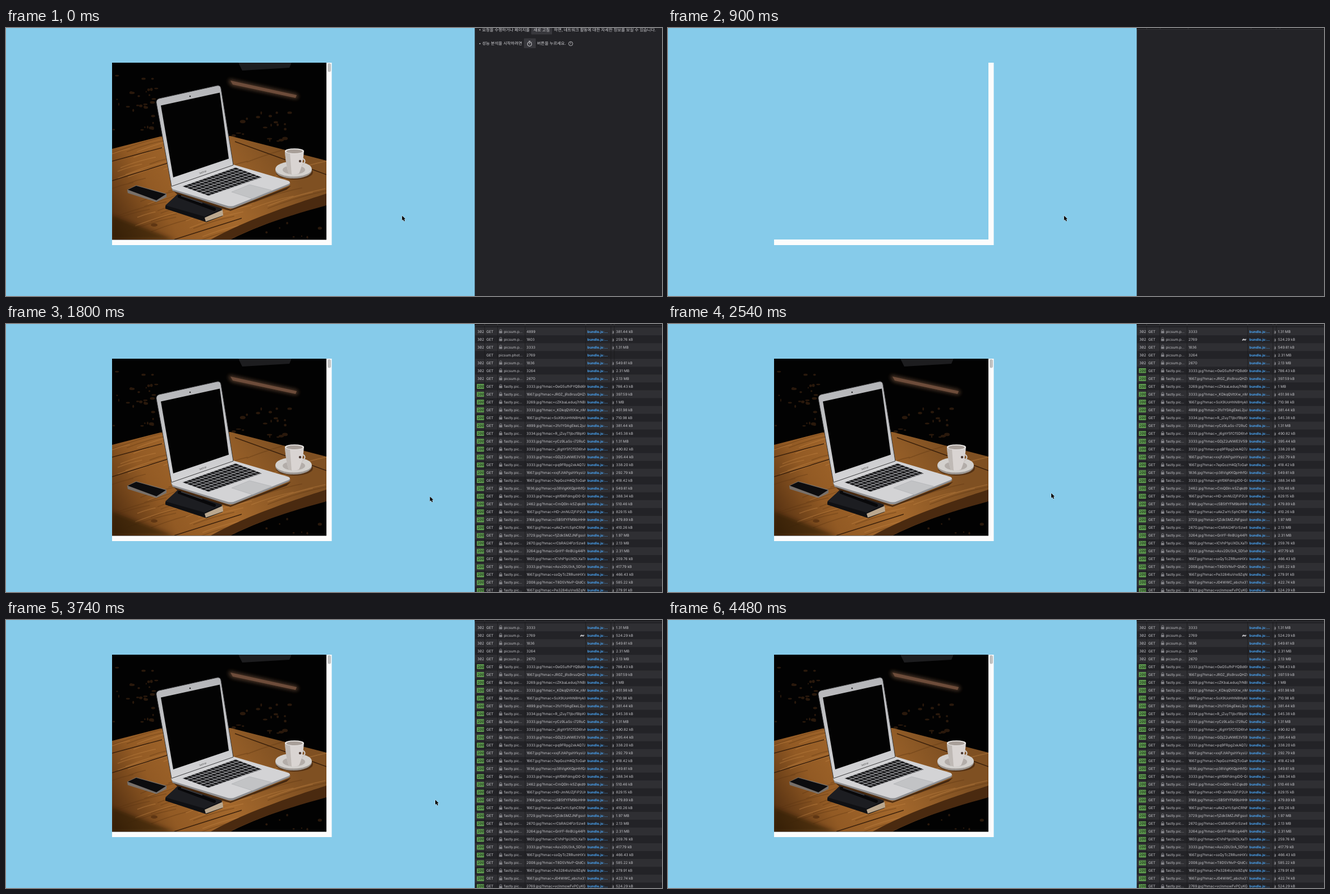
Recreate the animation shown at these times as an HTML page. Size 1169x479 px, loop 5080 ms.

```html
<!DOCTYPE html>
<html lang="ko">
<head>
<meta charset="utf-8">
<title>Network panel</title>
<style>
  html, body { margin: 0; width: 100%; height: 100%; overflow: hidden; background: #86cbea; }
  svg { display: block; width: 100%; height: 100%; }
  text { font-family: Inter, Roboto, sans-serif; font-size: 6.4px; fill: #c6c6ca; text-rendering: geometricPrecision; white-space: pre; }
  .ko { font-family: "Noto Sans CJK KR", "Noto Sans CJK", sans-serif; font-size: 7.3px; fill: #d2d2d6; }
  .code { font-family: "Noto Sans Mono", "DejaVu Sans Mono", monospace; font-size: 6.6px; }
  .ok { fill: #1d2b1c; }
  .link { fill: #4aa5f5; font-weight: 700; font-size: 6.2px; }
</style>
</head>
<body>
<svg viewBox="0 0 1169 479" preserveAspectRatio="none">
  <defs>
    <linearGradient id="wood" gradientUnits="userSpaceOnUse" x1="195" y1="378" x2="480" y2="205">
      <stop offset="0" stop-color="#4a290e"/>
      <stop offset=".3" stop-color="#925a24"/>
      <stop offset=".6" stop-color="#a4682c"/>
      <stop offset="1" stop-color="#7f5022"/>
    </linearGradient>
    <linearGradient id="lid" x1="0" y1="0" x2="0" y2="1">
      <stop offset="0" stop-color="#b4b5b8"/>
      <stop offset="1" stop-color="#d4d4d6"/>
    </linearGradient>
    <filter id="soft" x="-30%" y="-60%" width="160%" height="220%"><feGaussianBlur stdDeviation="3"/></filter>
    <pattern id="keys" width="1" height="1" patternUnits="userSpaceOnUse" patternTransform="matrix(6.800 -2.430 7.800 2.850 314 283)">
      <rect width="1" height="1" fill="#b4b5b8"/>
      <rect x=".08" y=".08" width=".84" height=".84" rx=".1" fill="#19191b"/>
    </pattern>
    <clipPath id="frame"><rect x="189" y="62" width="382" height="316.500"/></clipPath>
    <clipPath id="table"><path d="M189 216L275 194 400 193 571 237V296C515 314 430 342 365 378H189Z"/></clipPath>
    <clipPath id="file"><rect x="925" y="0" width="108" height="479"/></clipPath>
    <clipPath id="typeWide"><rect x="1085" y="0" width="5.500" height="479"/></clipPath>
    <clipPath id="type"><rect x="1079" y="0" width="4.600" height="479"/></clipPath>
  </defs>

  <rect width="1169" height="479" fill="#86cbea"/>
  <path d="M571 62H580.500V388H189V378H571Z" fill="#fcfcfc"/>
  <rect id="thumb" x="573" y="63" width="6" height="15.500" rx="3" fill="#c2c2c2"/>

  <g id="photo" clip-path="url(#frame)">
    <rect x="189" y="62" width="382" height="317" fill="#020202"/>
    <g id="leaves" fill="#2a190c"></g>
    <path d="M414 62H509L505 71 421 76Z" fill="#1d1d1f"/>
    <path d="M398 91L516 117Q526 122 517 127L404 104Q394 98 398 91Z" fill="#4c3426" filter="url(#soft)"/>
    <path d="M400 94L518 120 516 125 404 101Z" fill="#6d4c3a"/>
    <path d="M189 216L275 194 400 193 571 237V312C520 331 455 350 400 378H189Z" fill="url(#wood)"/>
    <path d="M571 296C515 314 430 342 365 378H400C455 350 520 331 571 317Z" fill="#4a2a10"/>
    <g clip-path="url(#table)">
      <g id="grain" fill="none" stroke-width="1.600" opacity=".35"></g>
      <path d="M189 273L287 242M408 203L571 262M189 238L278 214M300 378L420 340" fill="none" stroke="#3d220c" stroke-width="1.600"/>
    </g>
    <ellipse cx="264" cy="352" rx="6" ry="3" fill="#5f3613"/>
    <path d="M189 335L240 355 300 378H189Z" fill="#241305" opacity=".5" filter="url(#soft)"/>
    <path d="M296 289L400 324 508 282 500 289 400 327 310 302Z" fill="#2a1608" opacity=".7"/>

    <path d="M294 284L405 245 503 274Q510 278 503 282L408 321Q401 324 392 321L297 291Z" fill="#8e8f92"/>
    <path d="M294 282L405 244 503 273Q509 276 503 279L408 317Q401 320 392 317L297 288Z" fill="#d3d3d5"/>
    <path d="M314 283L409 249 456 267 361 300Z" fill="url(#keys)"/>
    <path d="M402 293L434 280 473 290 439 305Z" fill="#c2c3c5" stroke="#acadb0" stroke-width=".6"/>
    <path d="M273 126L376 103Q382 102 383 108L405 245 295 283 268 134Q267 128 273 126Z" fill="url(#lid)" stroke="#3b3b3d"/>
    <path d="M276 138.500L381 115.500 397 233.500 298 267Z" fill="#030303"/>
    <circle cx="328" cy="122" r="1.300" fill="#222"/>
    <text transform="translate(345 261) rotate(-19)" style="font-size:4.500px;fill:#555">laptop</text>

    <path d="M216 289L232 281 286 296V302L268 311 217 295Z" fill="#77706a"/>
    <path d="M217 289L232 282 285 297 268 308Z" fill="#0c0c0e"/>
    <path d="M284 318L306 297 386 325V336L357 347 284 323Z" fill="#0f1013"/>
    <path d="M354 339L386 325 387 335 356 346Z" fill="#bba88f"/>
    <path d="M284 317L306 297 386 323 354 337Z" fill="#1c1d21"/>
    <path d="M309 301L371 324" stroke="#08080a" stroke-width="6" stroke-linecap="round"/>
    <path d="M312 300L350 313" stroke="#55575c"/>

    <ellipse cx="514" cy="258" rx="33" ry="13" fill="#3b210d" opacity=".6"/>
    <ellipse cx="512.500" cy="254.500" rx="32.500" ry="14.500" fill="#9c9793"/>
    <ellipse cx="512.500" cy="252" rx="32.500" ry="13.500" fill="#d3d0cd"/>
    <ellipse cx="513" cy="253.500" rx="20" ry="8" fill="#b3ada9"/>
    <path d="M528 233Q538 237 526 247" fill="none" stroke="#cdc8c5" stroke-width="2.200"/>
    <path d="M497 220Q499 248 504 260 513 264 522 260 529 246 531 220Z" fill="#d9d4d2"/>
    <path d="M497 220Q499 248 504 260L509 262 506 224Z" fill="#bfb9b5"/>
    <ellipse cx="514" cy="220" rx="17" ry="4.800" fill="#e8e5e3"/>
    <ellipse cx="514" cy="220.500" rx="14.500" ry="3.600" fill="#a89f99"/>
    <circle cx="524" cy="238" r="2.200" fill="#4b3a34"/>
  </g>

  <rect x="835.300" width="333.700" height="479" fill="#232327"/>
  <g id="intro">
    <rect x="936" y="-7" width="37" height="18.500" rx="1" fill="#38383d"/>
    <rect x="923" y="18.500" width="21" height="17.500" rx="1" fill="#38383d"/>
    <circle cx="844.500" cy="3.300" r="1" fill="#d2d2d6"/>
    <circle cx="844.500" cy="28" r="1" fill="#d2d2d6"/>
    <text class="ko" x="848.500" y="5.600">요청을 수행하거나 페이지를</text>
    <text class="ko" x="940" y="5.600">새로 고침</text>
    <text class="ko" x="976.500" y="5.600">하면, 네트워크 활동에 대한 자세한 정보를 보실 수 있습니다.</text>
    <text class="ko" x="848.500" y="30">성능 분석을 시작하려면</text>
    <text class="ko" x="946.500" y="30">버튼을 누르세요.</text>
    <g fill="none" stroke="#d2d2d6">
      <circle cx="933" cy="28.700" r="3.800"/>
      <path d="M931.500 23.500H934.500M933 28.700V26.300M936 25.500L936.800 24.700"/>
      <circle cx="1006.300" cy="28" r="3.700" stroke-width=".8"/>
    </g>
    <text x="1004.500" y="30.200" style="font-size:6px">?</text>
  </g>
  <g id="first"></g>
  <g id="pending"></g>
  <g id="loading"></g>
  <g id="done"></g>
  <g id="header"></g>
  <g id="arrow"><path d="M0 .5V9L2 7.200 3.500 10.500 5 9.800 3.600 6.600H6.200Z" stroke="#fff" stroke-width=".8" paint-order="stroke"/></g>
  <g id="resize" fill="none">
    <path d="M0-5V5M-4.500 0H4.500" stroke="#fff" stroke-width="3.200"/>
    <path d="M0-4.500V4.500M-4 0H4M-2.500-1.500L-4 0-2.500 1.500M2.500-1.500L4 0 2.500 1.500" stroke="#111" stroke-width="1.100"/>
  </g>
</svg>

<script>
const LOOP = 5080, STEP = 14.03;
const $ = id => document.getElementById(id);
const parts = ['thumb', 'photo', 'intro', 'first', 'pending', 'loading', 'done', 'header', 'arrow', 'resize']
  .reduce((all, id) => ({ ...all, [id]: $(id) }), {});

// Photo texture: faint leaves behind the table, grain along the planks
let seed = 7;
const rand = (a, b) => a + (b - a) * ((seed = seed * 16807 % 2147483647) / 2147483647);
const many = (n, make) => Array.from({ length: n }, make).join('');
const leaf = (x0, x1, y0, y1) => () =>
  `<ellipse cx="${rand(x0, x1)}" cy="${rand(y0, y1)}" rx="${rand(1, 5)}" ry="${rand(1, 3)}"/>`;
$('leaves').innerHTML = many(30, leaf(192, 268, 85, 190)) + many(22, leaf(400, 510, 150, 205)) + many(8, leaf(440, 560, 345, 375));
$('grain').innerHTML = many(60, () => {
  const length = rand(30, 110);
  return `<path d="M${rand(170, 540)} ${rand(210, 380)}q${length / 2} ${-length * .2} ${length} ${-length * .3}" stroke="${rand(0, 1) < .6 ? '#5a3412' : '#c98a48'}"/>`;
});

const wide = { status: 840, host: 879, lock: 882.5, hostLocked: 888.3, file: 930, link: 1042, type: 1087.5, size: 1093.5,
  clip: 'typeWide', lines: [853, 877, 927, 1039, 1084, 1090.5] };
const narrow = { status: 840, host: 878, lock: 881.5, hostLocked: 887.2, file: 927.5, link: 1036, type: 1080.3, size: 1087,
  clip: 'type', lines: [853, 876, 925, 1033, 1078, 1084] };

const text = (x, y, str, cls = '', extra = '') => `<text x="${x}" y="${y + 2.3}" class="${cls}" ${extra}>${str}</text>`;
const box = (x, y, w, h, fill, extra = '') => `<rect x="${x}" y="${y}" width="${w}" height="${h}" fill="${fill}" ${extra}/>`;
const lock = (x, y) => box(x - 2.8, y - .8, 5.6, 4, '#85858a', 'rx=".6"') +
  `<path d="M${x - 1.7} ${y - .6}v-1.200a1.700 1.700 0 0 1 3.400 0v1.200" fill="none" stroke="#85858a"/>`;
const turtle = y => `<path d="M1023 ${y + 1.5}q2-4 5-1.500l2-1 .8 1.500-1.500 1v1h-1.500l-.5-.8h-2l-.5.800h-1.500z" fill="#b5b5b9"/>`;

function row(cols, y, light, r, hover) {
  let out = '';
  if (hover || light) out += box(836, y - STEP / 2, 333, STEP, hover ? '#353b48' : '#2f2f33');
  if (r.status === '200') out += box(839, y - 4.3, 13, 8.8, hover ? '#83c867' : '#5d9b4e', 'rx="1"');
  if (r.status) out += text(cols.status, y, r.status, r.status === '200' ? 'code ok' : 'code');
  out += text(856, y, 'GET');
  if (r.locked) out += lock(cols.lock, y);
  out += text(r.locked ? cols.hostLocked : cols.host, y, r.host);
  out += text(cols.file, y, r.file, '', 'clip-path="url(#file)"');
  out += text(cols.link, y, r.link, 'link', hover === 'link' ? 'text-decoration="underline"' : '');
  if (r.type) out += text(cols.type, y, r.type, '', `clip-path="url(#${cols.clip})"`);
  if (r.size) out += text(cols.size, y, r.size);
  if (r.slow) out += turtle(y);
  return out;
}

const rules = (cols, h, color) => cols.lines.map(x => box(x - .4, 0, .8, h, color)).join('');

const icons = [['logo192.png', 'png', '5.35 kB'], ['favicon.ico', 'x-icon', '3.87 kB']].map(([file, type, size]) =>
  ({ status: '200', locked: true, host: 'localhost:…', file, type, size, link: 'FaviconLoa…' }));

const ids = [...Array(5).fill('3333'), '3334', '3333', '3168', '3333', '3269', ...Array(10).fill('1667'),
  ...'2462 2008 3729 4899 1803 3333 2769 1836 3264 2670'.split(' ')];
const waiting = ids.map(file => ({ host: 'picsum.phot…', file, link: 'bundle.js:7…' }));

const redirects = `4899 381.44 kB
1803 259.76 kB
3333 1.31 MB
2769 524.29 kB
1836 549.61 kB
3264 2.31 MB
2670 2.13 MB`;
const images = `3333 OeG5ufhPYQBd6 786.43 kB
1667 JR0Z_jRs9rssQHZ 397.59 kB
3269 cZKbaLeduq7rNB 1 MB
3333 _KDkqQVttXw_nM 451.98 kB
1667 SoX9UoHhN8HykI 710.98 kB
4899 2fo1Y0AgEkeL2ju 381.44 kB
3334 R_jZuyT1jbcfBIpK 545.38 kB
3333 yCz9LaSs-i72RuC 1.31 MB
3333 _j6ghY5fCfSD6tv 490.82 kB
3333 GDjZ2uNWE3V59 395.44 kB
3333 pq9FRpg2xkAQ7J 338.20 kB
1667 xxjFJtAPgshYkysU 292.79 kB
1667 7epGozH4QjToGa 418.42 kB
1836 p38VigKKQpHhfG 549.61 kB
3333 ghf06FdmgiD0-G 388.34 kB
2462 CmQ0ln-k5Zqkdt 510.46 kB
1667 HD-JmNUZjFiP2U 829.15 kB
3168 c5B5tfYFM9biHH 479.89 kB
1667 uAkZwYc5phCRNF 410.26 kB
3729 fjZdkSMZJNFgsoI 1.97 MB
2670 rCbRAl24FzrSzwlI 2.13 MB
3264 GnYF-RnBUg44PI 2.31 MB
1803 ICVhP1pUXOLXaT 259.76 kB
3333 Asv2DU3rA_5D1x 417.79 kB
1667 ssQyTcZRRumHXV 466.43 kB
2008 T8DSVNvP-QldCc 585.22 kB
1667 Pe3284luVre9ZqN 279.91 kB
1667 J04WWC_ebchx3T 422.74 kB
2769 vclnmowFvPCyKG 524.29 kB`;

const reply = { locked: true, link: 'bundle.js:…', type: 'jpeg' };
const moved = redirects.split('\n').map(line => {
  const [file, ...size] = line.split(' ');
  return { ...reply, status: '302', host: 'picsum.p…', file, size: size.join(' '), slow: file === '2769' };
});
const loaded = images.split('\n').map(line => {
  const [id, key, ...size] = line.split(' ');
  return { ...reply, status: '200', host: 'fastly.pic…', file: `${id}.jpg?hmac=${key}Kd8s`, size: size.join(' ') };
});
const finished = [...moved, ...loaded];
const inFlight = finished.map(r => r.slow ? { host: 'picsum.phot…', file: r.file, link: r.link } : r);

const table = (cols, rows, top, hoverRow, hover) =>
  rows.map((r, i) => row(cols, top + i * STEP, i % 2 === 0, r, i === hoverRow && hover)).join('') + rules(cols, 479, '#1a1a1d');
const doneTable = (hoverRow, hover) => table(narrow, finished.slice(2), 13.2, hoverRow, hover);

parts.first.innerHTML = icons.map((r, i) => row(wide, 10 + i * STEP, i % 2, r)).join('') + rules(wide, 31, '#1a1a1d');
parts.pending.innerHTML = waiting.map((r, i) => row(wide, 38.1 + i * STEP, i % 2, r)).join('') + rules(wide, 452, '#1a1a1d');
parts.loading.innerHTML = table(narrow, inFlight.slice(0, 34), 13.2);
const header = cols => box(835.3, 0, 333.7, 2.2, '#19191c') + box(835.3, 2, 333.7, .8, '#3a3a3f') + rules(cols, 2, '#3a3a3f');

// time, x, y of the pointer
const path = [
  [0, 705.8, 335], [1500, 705.8, 318], [1800, 755.5, 308], [1940, 753, 307], [2240, 732, 306], [2390, 683, 302],
  [3290, 680.5, 292], [3440, 680, 277], [3590, 683, 278], [3740, 765, 321], [3890, 965, 372],
  [4030, 1081, 437], [4180, 1080, 458], [4330, 1078, 473], [4480, 1078, 500]
];
// time, hovered row
const hovers = [[0, -1], [3890, 25], [4030, 29], [4180, 32], [4330, 33], [4480, -1]];
const at = (steps, t) => steps.filter(s => s[0] <= t).pop();

const show = (part, on) => part.style.display = on ? '' : 'none';
let hovered, headCols;

function draw(t) {
  const between = (a, b) => t >= a && t < b;
  show(parts.photo, !between(900, 1800));
  show(parts.thumb, !between(900, 1200));
  show(parts.intro, t < 900);
  show(parts.first, between(1200, 1800));
  show(parts.pending, between(1350, 1800));
  show(parts.loading, between(1800, 2540));
  show(parts.done, t >= 2540);
  show(parts.header, t >= 900);

  const cols = t < 1800 ? wide : narrow;
  if (cols !== headCols) parts.header.innerHTML = header(headCols = cols);

  const index = at(hovers, t)[1];
  if (index !== hovered) parts.done.innerHTML = doneTable(hovered = index, index === 29 ? 'link' : 'row');

  const [, x, y] = at(path, t), resizing = between(4030, 4180);
  show(parts.arrow, !resizing);
  show(parts.resize, resizing);
  parts[resizing ? 'resize' : 'arrow'].setAttribute('transform', `translate(${x} ${y})`);
}

const start = performance.now();
function tick() {
  draw((performance.now() - start) % LOOP);
  requestAnimationFrame(tick);
}
tick();
</script>
</body>
</html>
```
